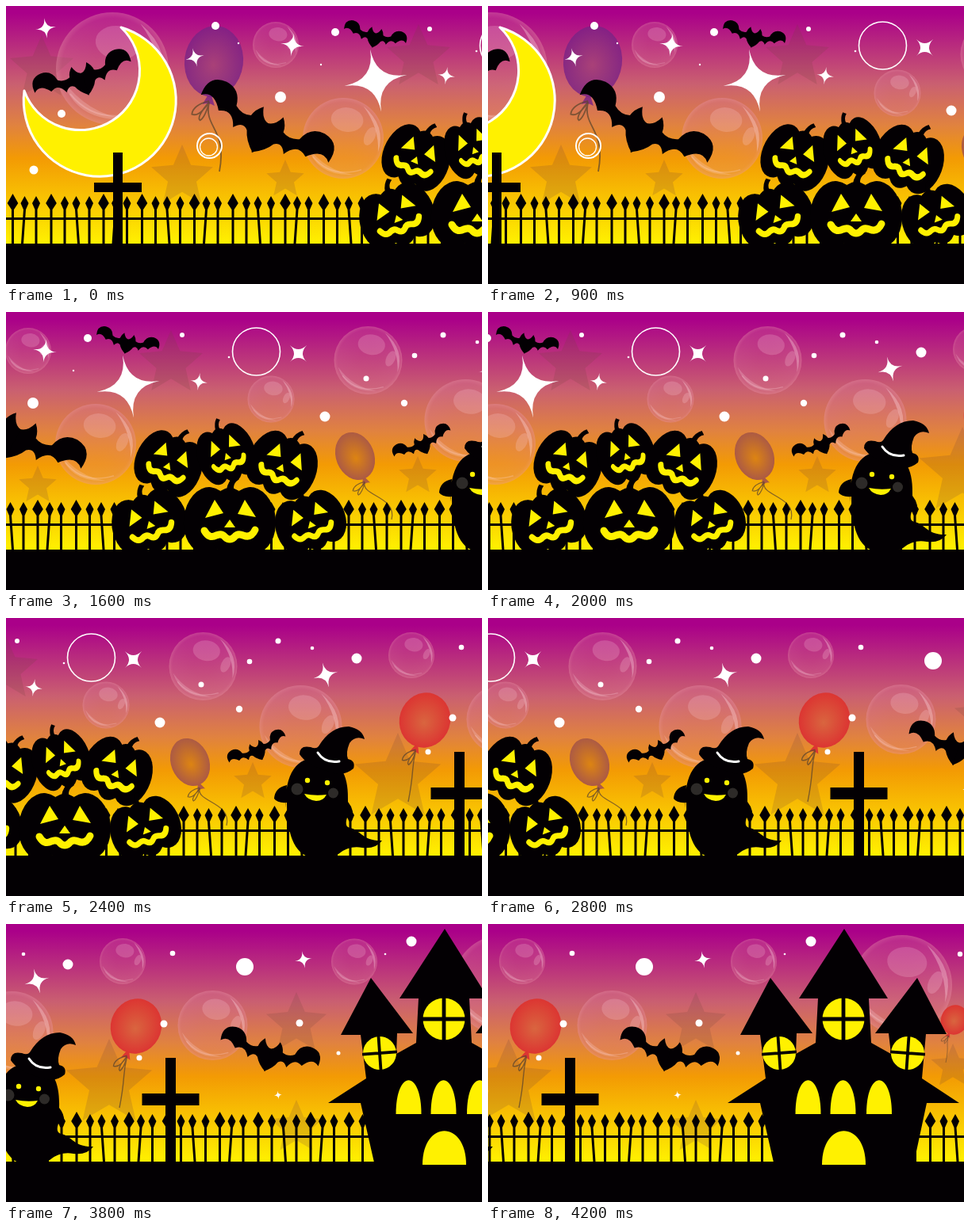
Write an HTML page with a canvas that moves like this. It is 600 px wide and 351 px high and loops after 4.7 s.

```html
<!DOCTYPE html>
<html lang="en">
<head>
<meta charset="utf-8">
<title>Halloween night</title>
<style>
html, body { margin: 0; width: 600px; height: 351px; overflow: hidden; background: #030003; }
canvas { display: block; }
</style>
</head>
<body>
<canvas id="stage" width="600" height="351"></canvas>
<script>
const c = document.getElementById('stage').getContext('2d');
const BLACK = '#030003', YELLOW = '#fff100', WHITE = '#fff', TAU = Math.PI * 2;
const LOOP = 4700, STEP = 26, STEPS = 38;

function at(x, y, deg, sx, sy, draw) {
  c.save();
  c.translate(x, y);
  c.rotate(deg * Math.PI / 180);
  c.scale(sx, sy);
  draw();
  c.restore();
}
function fill(d, color) {
  c.fillStyle = color;
  c.fill(new Path2D(d));
}
function line(d, color, width) {
  c.strokeStyle = color;
  c.lineWidth = width;
  c.stroke(new Path2D(d));
}
function oval(x, y, rx, ry, color, deg = 0) {
  c.fillStyle = color;
  c.beginPath();
  c.ellipse(x, y, rx, ry, deg * Math.PI / 180, 0, TAU);
  c.fill();
}
const dot = (x, y, r, color = WHITE) => oval(x, y, r, r, color);
function ring(x, y, r, width, color = WHITE) {
  c.strokeStyle = color;
  c.lineWidth = width;
  c.beginPath();
  c.arc(x, y, r, 0, TAU);
  c.stroke();
}

function sky() {
  const g = c.createLinearGradient(0, 0, 0, 300);
  g.addColorStop(0, '#aa0089');
  g.addColorStop(0.03, '#aa0089');
  g.addColorStop(0.33, '#ca6070');
  g.addColorStop(0.5, '#e08240');
  g.addColorStop(0.64, '#f39a04');
  g.addColorStop(1, YELLOW);
  c.fillStyle = g;
  c.fillRect(0, 0, 600, 300);
}

function shadowStar(x, y, r) {
  c.fillStyle = 'rgba(110,65,60,.19)';
  c.beginPath();
  for (let i = 0; i < 10; i++) {
    const a = i * TAU / 10, d = i % 2 ? r * 0.46 : r;
    c.lineTo(x + d * Math.sin(a), y - d * Math.cos(a));
  }
  c.fill();
}

function bubble(x, y, r) {
  at(x, y, 0, r, r, () => {
    const g = c.createRadialGradient(0, 0, 0.3, 0, 0, 1);
    g.addColorStop(0, 'rgba(220,120,150,.2)');
    g.addColorStop(0.85, 'rgba(220,120,155,.28)');
    g.addColorStop(1, 'rgba(235,150,170,.4)');
    dot(0, 0, 1, g);
    oval(0.1, -0.46, 0.4, 0.3, 'rgba(255,215,225,.2)', 8);
    oval(0.66, -0.05, 0.13, 0.24, 'rgba(255,215,225,.22)', 25);
    fill('M.5-.8Q1.08-.3 .86.35Q.9-.25 .5-.8Z', 'rgba(255,220,225,.35)');
    fill('M-.88.2Q-.65.95 .25.9Q-.45.8 -.88.2Z', 'rgba(255,220,225,.22)');
    line('M-.75.45Q-.3 1 .45.78', 'rgba(255,220,225,.25)', 0.03);
  });
}

function balloon(x, y, rx, ry, deg, mid, edge, endX, endY) {
  const a = deg * Math.PI / 180, s = ry / 35;
  const kx = x - Math.sin(a) * ry * 1.06, ky = y + Math.cos(a) * ry * 1.06;
  at(x, y, deg, rx, ry, () => {
    const g = c.createRadialGradient(0, 0.1, 0, 0, 0, 1);
    g.addColorStop(0, mid);
    g.addColorStop(1, edge);
    dot(0, 0, 1, g);
  });
  at(kx, ky, deg, s, s, () => fill('M-2-3L2-3L6 6Q0 3-6 6Z', edge));
  at(kx, ky, 0, s, s, () => {
    const ex = (x + endX - kx) / s, ey = (y + endY - ky) / s;
    line(`M0 2Q-16 6-17 15Q-10 18 0 3Q-13 18-9 21Q-4 18 0 3C-6 ${ey * 0.4} ${ex + 8} ${ey * 0.4} ${ex} ${ey}`,
      'rgba(95,70,45,.75)', 1.4);
  });
}

function sparkle(x, y, r, deg) {
  at(x, y, deg, r, r, () =>
    fill('M0-1Q.02-.02 1 0Q.02.02 0 1Q-.02.02-1 0Q-.02-.02 0-1Z', WHITE));
}

function bat(x, y, size, deg) {
  const half = 'M-1-8Q9-9 14-24Q22-16 23-7Q34-2 45-9Q50-30 70-30Q95-28 91 0' +
    'Q78-13 62 7Q46-4 36 17Q28 4 19 12Q14 24-1 34Z';
  for (const side of [1, -1]) at(x, y, deg, side * size, size, () => fill(half, BLACK));
}

function fence() {
  const offsets = [0, 17, 31.5, 48, 66, 81, 95.5], period = 114.5;
  c.fillStyle = BLACK;
  c.fillRect(0, 267, 1600, 3);
  for (let base = 57 - period; base < 1600; base += period) {
    offsets.forEach((o, i) => {
      const x = base + o, big = i % 4 === 0;
      const w = big ? 6.8 : 5, top = big ? 237 : 240;
      const lean = i === 2 ? 3 : i === 5 ? -3 : 0;
      fill(`M${x} ${top}L${x + w} 249L${x + 1.5} 257L${x + 1.5 + lean} 300h-3L${x - 1.5} 257L${x - w} 249Z`, BLACK);
    });
  }
}

function cross(x, y, w, h, armY, armH, armW) {
  c.fillStyle = BLACK;
  c.fillRect(x - w / 2, y, w, h);
  c.fillRect(x - armW / 2, armY, armW, armH);
}

function pumpkin(x, y, sx, sy, deg) {
  at(x, y, deg, sx, sy, () => {
    oval(-28, 1, 30, 42, BLACK, 6);
    oval(28, 1, 30, 42, BLACK, -6);
    oval(0, 3, 27, 43, BLACK);
    fill('M-4-38Q-2-49 6-55L12-51Q4-46 5-38Z', BLACK);
    fill('M-19-25L-31-2L-8-8ZM19-25L10-7L33-3ZM0 0L-7 10L7 10Z', YELLOW);
    c.lineCap = c.lineJoin = 'round';
    line('M-32 14Q-26 25-17 20Q-10 17-6 22Q0 28 6 22Q10 17 17 20Q27 24 32 13', YELLOW, 9);
  });
}

function ghost(x) {
  at(x, 0, 0, 1, 1, () => {
    fill('M248 240C248 195 262 176 290 176C322 178 328 205 327 232Q336 243 332 256L326 252' +
      'Q322 264 330 265C343 268 346 282 370 281Q362 292 345 290Q328 287 315 298Q300 306 282 303C258 298 250 270 250 233' +
      'Q238 234 234 228Q235 214 250 211Z', BLACK);
    fill('M266 172Q266 160 280 163Q287 166 290 162Q305 137 328 137Q345 140 348 153Q336 148 329 158' +
      'Q324 170 327 178Q337 180 334 190Q320 202 300 193Q275 186 266 172Z', BLACK);
    c.lineCap = 'round';
    line('M289 170Q298 184 316 181', WHITE, 3);
    dot(263, 216, 7.5, '#2d2a28');
    dot(308.5, 221, 6.5, '#2d2a28');
    dot(276, 205, 3.2, YELLOW);
    dot(301, 208, 3.2, YELLOW);
    fill('M272 222Q286 225 300 223Q296 231 287 231Q276 230 272 222Z', YELLOW);
  });
}

function roundWindow(x, y, r, deg) {
  at(x, y, deg, 1, 1, () => {
    dot(0, 0, r, YELLOW);
    c.lineCap = 'butt';
    line(`M${-r - 1} 0H${r + 1}M0 ${-r - 1}V${r + 1}`, BLACK, r * 0.18);
  });
}

function castle(x) {
  at(x, 0, 0, 1, 1, () => {
    fill('M449 6L504 94H480L483 150L508 164L505 138H488L541 68L578 139H552L547 195L594 226H553L537 301' +
      'H360L343 226H302L350 195L343 140H318L356 68L409 138H389L388 164L413 150L416 94H392Z', BLACK);
    roundWindow(448, 120, 26.5, 0);
    roundWindow(367, 163, 21, -4);
    roundWindow(529, 163, 21, 4);
    for (const w of [403.5, 447.5, 493]) {
      fill(`M${w - 16} 240C${w - 16} 183 ${w + 16} 183 ${w + 16} 240Z`, YELLOW);
    }
  });
}

function scenery() {
  shadowStar(45, 79, 42);
  shadowStar(222, 216, 41);
  shadowStar(352, 219, 25);
  shadowStar(520, 65, 42);
  shadowStar(831, 207, 25);
  shadowStar(1014, 202, 57);
  shadowStar(1250, 126, 40);
  shadowStar(1250, 257, 35);
  shadowStar(1574, 180, 29);

  bubble(134, 79, 71);
  bubble(340, 49, 29);
  bubble(425, 167, 51);
  bubble(646, 110, 29.5);
  bubble(768.5, 61, 43);
  bubble(891.5, 137, 52);
  bubble(1031, 47, 29);
  bubble(1144.5, 128, 44);
  bubble(1323, 47.5, 29);
  bubble(1510, 77, 63);

  balloon(262, 70, 37, 45, 7, 'rgba(165,64,120,.85)', 'rgba(122,34,133,.82)', 7, 139);
  balloon(752, 182, 24, 31, -22, '#dd8412', '#ac5a44', 46, 80);
  balloon(1048, 129, 32, 35, 18, '#d9653f', '#dc3532', -21, 103);
  balloon(1576, 121, 17, 19, 22, '#d9653f', '#dc3532', -11, 54);

  c.lineJoin = 'round';
  const moon = 'M145 27A96 96 0 1 1 23 107A75 75 0 1 0 145 27Z';
  fill(moon, YELLOW);
  line(moon, WHITE, 3);

  ring(256.5, 176.5, 15.5, 2);
  ring(255.5, 178, 11, 1.3);
  ring(627.5, 50, 30, 1.6);

  const dots = [
    [70, 136, 5], [35, 207, 5.5], [264, 25, 5], [293, 47, 1.2], [346, 115, 7], [415, 33, 5],
    [397, 74, 1.2], [534, 29, 3], [593, 57, 1.3], [714, 132, 6.5], [766, 84, 3.5], [814, 115, 4.2],
    [827, 55, 3.3], [863, 29, 3.5], [906, 38, 2.3], [962, 51, 6.5], [1094, 37, 3.3], [1083, 126, 4.5],
    [1052, 169, 3.5], [1185, 54, 11], [1254, 125, 4.5], [1303, 163, 2.5], [1362, 38, 1.3],
    [1395, 22, 6.5], [1583, 38, 3.2]
  ];
  for (const d of dots) dot(...d);

  sparkle(50, 28, 13, -8);
  sparkle(238, 65, 12, -14);
  sparkle(361, 49, 15, 8);
  sparkle(466, 94, 40, -10);
  sparkle(555, 88, 11, 8);
  sparkle(680.5, 52.5, 15, 45);
  sparkle(923, 72, 16, -15);
  sparkle(1259, 45, 11, -10);
  sparkle(1227, 216, 5.5, -10);

  fence();
  cross(141, 185, 12, 116, 223, 12, 60);
  cross(1091.5, 169, 13, 132, 214, 15, 72);

  bat(97, 90, 0.7, -18);
  bat(326, 155, 1, 28);
  bat(465, 38, 0.44, 13);
  bat(837, 166, 0.43, -25);
  bat(1216, 163, 0.7, 15);

  pumpkin(518, 190, 0.73, 0.86, 23);
  pumpkin(589, 178, 0.63, 0.82, -20);
  pumpkin(661, 192, 0.76, 0.88, 25);
  pumpkin(492, 264, 0.82, 0.86, -20);
  pumpkin(695, 264, 0.77, 0.82, -20);
  pumpkin(594, 262, 1, 1, 0);

  ghost(624);
  castle(988);
}

function frame(now) {
  const t = now % LOOP;
  const step = Math.max(0, Math.min(STEPS, Math.floor((t - 400) / 100)));
  sky();
  c.save();
  c.translate(-step * STEP, 0);
  scenery();
  c.fillStyle = BLACK;
  c.fillRect(0, 300, 1600, 51);
  fill('M1409 304C1409 247 1464 247 1464 304Z', YELLOW);
  c.restore();
  requestAnimationFrame(frame);
}
requestAnimationFrame(frame);
</script>
</body>
</html>
```
